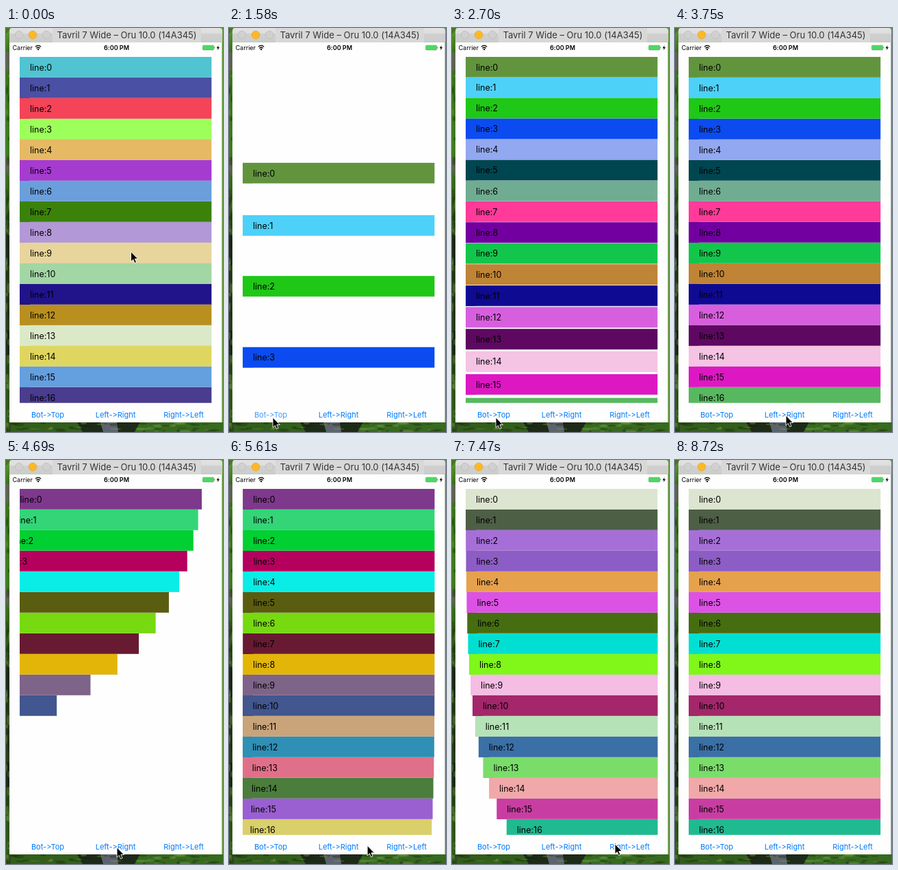
An HTML page that plays this animation: 317x587 px, repeating every 8.79 s.

```html
<!DOCTYPE html>
<html lang="en">
<head>
<meta charset="utf-8">
<title>Table row animations</title>
<style>
html, body { margin: 0; width: 100%; height: 100%; overflow: hidden; background: #fff; }
svg { display: block; width: 100vw; height: 100vh; }
text { font-family: Inter, Roboto, sans-serif; font-feature-settings: "calt" 0; font-variant-ligatures: none; }
.row text { font-size: 12.5px; }
.btn { font-size: 11px; fill: #007aff; text-anchor: middle; }
.bar { font-size: 9px; }
</style>
</head>
<body>
<svg id="stage" viewBox="0 0 317 587" preserveAspectRatio="none">
  <defs>
    <linearGradient id="title" x2="0" y2="1">
      <stop stop-color="#e2e2e2"/><stop offset=".36" stop-color="#dedede"/>
      <stop offset=".42" stop-color="#d0d0d0"/><stop offset="1" stop-color="#cccccc"/>
    </linearGradient>
    <linearGradient id="field" x2="0" y2="1">
      <stop stop-color="#5f9a30"/><stop offset=".06" stop-color="#39701c"/>
      <stop offset=".3" stop-color="#3f7d1c"/><stop offset=".5" stop-color="#2c4a1a"/>
      <stop offset=".7" stop-color="#28381c"/><stop offset=".9" stop-color="#2c5217"/>
      <stop offset="1" stop-color="#33601c"/>
    </linearGradient>
    <clipPath id="table"><rect x="20" y="42" width="280.5" height="502.7"/></clipPath>
  </defs>

  <rect width="317" height="587" fill="url(#field)"/>
  <path d="M0 35H5V62H0ZM0 185L5 195V218L0 205Z" fill="#5c6450"/>
  <path d="M0 300H5V345H0ZM0 440H5V475H0ZM104 573H196L188 587H112Z" fill="#1c2a17"/>
  <path d="M138 573H162L164 587H142Z" fill="#5b636d"/>
  <path d="M196 573H317V587H188Z" fill="#376a1e"/>
  <g id="grass"></g>
  <rect x="315.5" width="1.5" height="573" fill="#5c9430"/>

  <path d="M5 20.5V4Q5 0 9 0H312Q316 0 316 4V20.5Z" fill="url(#title)"/>
  <rect x="68" width="217" height="20.5" fill="#d8d8d8"/>
  <g stroke-width=".7">
    <circle cx="19" cy="10" r="5.8" fill="#d0d0d0" stroke="#b9b9b9"/>
    <circle cx="39" cy="10" r="5.8" fill="#fdb827" stroke="#e3a21f"/>
    <circle cx="59" cy="10" r="5.8" fill="#d0d0d0" stroke="#b9b9b9"/>
  </g>
  <text x="176.5" y="15" font-size="13" fill="#333" text-anchor="middle">Tavril 7 Wide – Oru 10.0 (14A345)</text>

  <rect x="5" y="20.5" width="310.5" height="552.5" fill="#fefefe"/>
  <text class="bar" x="9.5" y="32">Carrier</text>
  <g fill="none" stroke="#000" stroke-width="1.3">
    <path d="M42.8 27.4Q47 23.4 51.2 27.4M44.4 29.4Q47 27 49.6 29.4"/>
    <circle cx="47" cy="31.2" r=".5"/>
  </g>
  <text class="bar" x="161.5" y="32" font-weight="600" text-anchor="middle">6:00 PM</text>
  <rect x="287.4" y="25.2" width="16.2" height="6.8" rx="1.2" fill="#4cd964" stroke="#5a8a62" stroke-width=".5"/>
  <path d="M304.4 27.3Q305.6 28.6 304.4 29.9Z"/>
  <path d="M310.6 25L307.6 29.2H309.6L308.8 32.4L312 28H310Z"/>

  <g id="rows" clip-path="url(#table)"></g>

  <text class="btn" x="61" y="566">Bot-&gt;Top</text>
  <text class="btn" x="160" y="566">Left-&gt;Right</text>
  <text class="btn" x="259.5" y="566">Right-&gt;Left</text>
  <path id="cursor" d="M0 0V14.5L3.3 11.4L5.5 16.5L8 15.4L5.8 10.5H10.3Z" stroke="#fff" stroke-width=".9"/>
</svg>

<script>
const LOOP = 8790, COUNT = 17, ROW = 30, STEP = 47.1;
const TABLE = { x: 20, y: 42, w: 280.5, h: 502.7 };

// Each run: start time, direction the rows come from, row colours.
const runs = [
  { at: -9000, dx: 0, dy: 0, colors: '50c4d0 4a50a4 f54358 9cff5a e6b964 a63bd0 6a9fdc 3b820a b298d6 e8d59c a2d6a4 21138a b9901f dbe9c8 dfd660 649fe0 4a3c8e' },
  { at: 1359, dx: 0, dy: 1, colors: '62943e 4dd1f8 1fc716 0b4bf0 92a8f0 004650 70ac92 ff3a99 7200a0 12c64c bf8435 0f0a92 d75fde 5e0861 f5c3e3 dd18c2 58b860' },
  { at: 4178, dx: -1, dy: 0, colors: '7e388c 33d577 00d032 b6005e 0aece6 5a5c10 77d910 681a32 e3b508 7e6488 42568f c9a37a 2f8fb5 e0708a 4b7d3c 9a5fd1 d9cf6b' },
  { at: 6432, dx: 1, dy: 0, colors: 'dce5d0 4d5f45 a66fd8 8c5dc4 e6a14d dc52e4 466e10 00dfd2 80f719 f5bce4 a3276a b6e2b8 3a70a6 7add6a f0a8a8 c83da2 20ba90' }
].map(r => ({ ...r, colors: r.colors.split(' ').map(c => '#' + c) }));

// Pointer stops: time, x, y.
const stops = [
  [80, 182.5, 325], [300, 66.5, 510], [470, 66.5, 510], [700, 65, 573], [930, 64, 566],
  [3000, 64, 566], [3400, 108, 576], [3750, 162, 563], [5300, 162, 563],
  [5900, 238, 558], [8150, 238, 558], [8600, 240, 592]
];

const el = (name, attrs, parent) => {
  const node = document.createElementNS('http://www.w3.org/2000/svg', name);
  for (const key in attrs) node.setAttribute(key, attrs[key]);
  return parent.appendChild(node);
};

// Seeded flecks of light and shade on the visible edges of the desktop.
let seed = 7;
const rand = () => (seed = seed * 16807 % 2147483647) / 2147483647;
const grass = document.getElementById('grass');
for (let i = 0; i < 110; i++) {
  const left = i % 2;
  el('ellipse', {
    cx: left ? rand() * 5 : rand() * 317,
    cy: left ? rand() * 587 : 573 + rand() * 14,
    rx: left ? 1 + rand() * 2 : 2 + rand() * 7,
    ry: left ? 2 + rand() * 6 : 0.6 + rand() * 1.6,
    fill: rand() < 0.6 ? '#17260f' : '#7fa650',
    opacity: 0.35
  }, grass);
}

const rowBox = document.getElementById('rows');
const cursor = document.getElementById('cursor');
const buttons = document.querySelectorAll('.btn');
const rows = Array.from({ length: COUNT }, (_, i) => {
  const g = el('g', { class: 'row' }, rowBox);
  const bg = el('rect', { width: TABLE.w, height: ROW }, g);
  el('rect', { x: 15, y: ROW - 0.3, width: TABLE.w - 15, height: 0.3, fill: '#c8c7cc' }, g);
  el('text', { x: 15, y: 19.8 }, g).textContent = 'line:' + i;
  return { g, bg };
});

// Lightly underdamped spring from 1 to 0; n counts row delays.
const spring = n => n <= 0 ? 1 : Math.exp(-0.238 * n) * Math.cos(0.074 * n);
const smooth = p => p * p * (3 - 2 * p);
const clamp = p => Math.min(1, Math.max(0, p));

function pointer(t) {
  let k = 0;
  while (k < stops.length - 2 && t >= stops[k + 1][0]) k++;
  const [t0, x0, y0] = stops[k], [t1, x1, y1] = stops[k + 1];
  const p = smooth(clamp((t - t0) / (t1 - t0)));
  return [x0 + (x1 - x0) * p, y0 + (y1 - y0) * p];
}

function draw(t) {
  const run = runs.filter(r => t >= r.at).pop();
  rows.forEach(({ g, bg }, i) => {
    const off = spring((t - run.at) / STEP - i);
    const x = TABLE.x + run.dx * TABLE.w * off;
    const y = TABLE.y + i * ROW + run.dy * TABLE.h * off;
    g.setAttribute('transform', `translate(${x.toFixed(2)} ${y.toFixed(2)})`);
    bg.setAttribute('fill', run.colors[i]);
  });
  buttons.forEach((b, i) => {
    const since = t - runs[i + 1].at;
    b.setAttribute('opacity', since < 0 ? 1 : 0.5 + 0.5 * clamp(since / 450));
  });
  cursor.setAttribute('transform', `translate(${pointer(t).join(' ')})`);
}

const start = performance.now();
function tick() {
  draw((performance.now() - start) % LOOP);
  requestAnimationFrame(tick);
}
tick();
</script>
</body>
</html>
```
